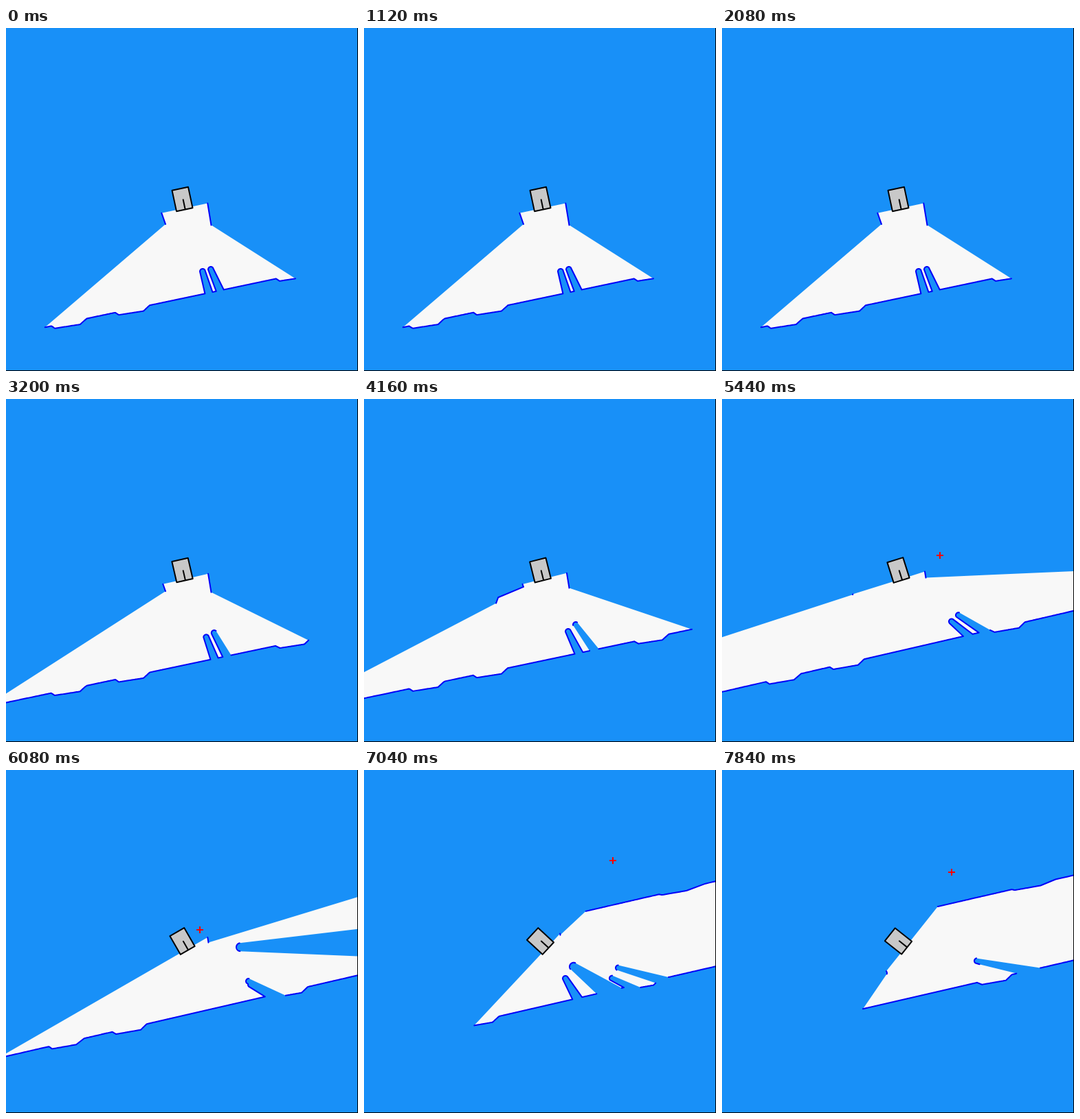
These frames come from a looping animation (512x500 px, 8000 ms). An HTML page with a canvas:

```html
<!DOCTYPE html>
<html lang="en">
<head>
<meta charset="utf-8">
<title>Range scan</title>
<style>
  html, body { margin: 0; width: 100%; height: 100%; overflow: hidden; background: #1890f8; }
  canvas { display: block; width: 100vw; height: 100vh; }
</style>
</head>
<body>
<canvas id="stage" width="512" height="500"></canvas>
<script>
// A robot sweeps a half circle of rays; the area they reach is the floor it can see.
const ctx = document.getElementById('stage').getContext('2d');
const LOOP = 8000, STEP = 160;
const SKY = '#1890f8', FLOOR = '#f8f8f8', WALL = '#0000f8';
const RAYS = 900, RANGE = 900, LINK = 41;
const ROBOT = { x: 256.5, y: 249.5, w: 24, h: 31, sensor: 13.5 };

// time, world dx, dy, shear, robot heading in degrees
const DRIVE = [
  [2320, 0, 0, 0, -12], [4160, 0, -12, 0, -14], [5440, -2, -25, -.02, -17.5],
  [6080, -4, -34, -.02, -30], [7040, -13, -45, -.02, -47], [7840, -21, -52, -.02, -51.5]
];

// time, x, y of each walking leg
const LEGS = [
  { r: 4, path: [[2320,286,355], [4160,297,351], [5440,336,352], [6080,357,345], [7040,374,352], [7840,392,334]] },
  { r: 4, path: [[2320,298,352], [4160,308,341], [5440,346,343], [6080,360,350], [7040,383,337], [7840,398,336]] },
  { r: 4, path: [[4160,540,250], [5440,410,270], [6080,366,294], [7040,306,351], [7840,257,349]] },
  { r: 6, path: [[4160,520,262], [5440,393,279], [6080,345,295], [7040,318,334], [7840,240,320]] }
];
const GOAL = [[4320,320,223], [5440,317,228], [6080,282,233], [6720,345,134], [7040,362,132], [7200,358,100], [7840,334,149]];

const LEFT_JAMB = [[225,266], [232,286], [196,299], [192,310]];
const RIGHT_JAMB = [[298.5,287.5], [293,254]];

function at(keys, t) {
  let i = 0;
  while (i < keys.length - 2 && t >= keys[i + 1][0]) i++;
  const [a, b] = [keys[i], keys[i + 1]];
  const p = Math.min(1, Math.max(0, (t - a[0]) / (b[0] - a[0])));
  return a.slice(1).map((v, n) => v + (b[n + 1] - v) * p);
}

const noise = n => { const v = Math.sin(n * 12.9898) * 43758.5453; return v - Math.floor(v) - .5; };

// A sloping corridor wall with shallow door recesses
function corridorWall(from, offset, depth, doors, t) {
  const point = (x, d) => [x, 448.3 - .211 * x + offset + d];
  const recesses = doors.flatMap(([a, b]) => {
    const shake = noise(a + t);
    return [point(a + shake, 0), point(a + 5, depth - 1), point(b - 9, depth + 1), point(b + shake, 0)];
  });
  return [point(from, 0), ...recesses, point(2000, 0)];
}

function buildWorld(t) {
  const [dx, dy, shear] = at(DRIVE, t);
  const place = ([x, y]) => [x + dx, y + dy + shear * (x - 205)];
  const lines = [
    corridorWall(-2000, 0, 5.5, [[66, 117], [159, 209], [393, 443]], t),
    corridorWall(325, -124, 3, [[442, 494]], t),
    LEFT_JAMB, RIGHT_JAMB
  ].map(line => line.map(place));
  return {
    segments: lines.flatMap(line => line.slice(1).map((end, i) => [line[i], end])),
    legs: LEGS.map(leg => ({ r: leg.r, c: place(at(leg.path, t)) }))
  };
}

function castRay([sx, sy], angle, world) {
  const ux = Math.cos(angle), uy = Math.sin(angle);
  let dist = RANGE;
  for (const [[ax, ay], [bx, by]] of world.segments) {
    const ex = bx - ax, ey = by - ay, det = ux * ey - uy * ex;
    const along = ((ax - sx) * ey - (ay - sy) * ex) / det;
    const part = ((ax - sx) * uy - (ay - sy) * ux) / det;
    if (along > 0 && part >= 0 && part <= 1) dist = Math.min(dist, along);
  }
  for (const { r, c } of world.legs) {
    const px = c[0] - sx, py = c[1] - sy;
    const along = px * ux + py * uy, side = px * uy - py * ux;
    if (along > 0 && Math.abs(side) < r) dist = Math.min(dist, along - Math.sqrt(r * r - side * side));
  }
  return { x: sx + ux * dist, y: sy + uy * dist, dist };
}

function drawScan(t, heading) {
  const sensor = [ROBOT.x - ROBOT.sensor * Math.sin(heading), ROBOT.y + ROBOT.sensor * Math.cos(heading)];
  const world = buildWorld(t);
  const hits = Array.from({ length: RAYS + 1 }, (_, i) => castRay(sensor, heading + Math.PI * i / RAYS, world));

  ctx.beginPath();
  ctx.moveTo(...sensor);
  hits.forEach(h => ctx.lineTo(h.x, h.y));
  ctx.fillStyle = FLOOR;
  ctx.fill();

  // Only neighbouring hits that lie close together count as one surface.
  ctx.beginPath();
  hits.forEach((h, i) => {
    const last = hits[i - 1];
    const linked = last && h.dist < RANGE && last.dist < RANGE && Math.hypot(h.x - last.x, h.y - last.y) < LINK;
    if (linked) ctx.lineTo(h.x, h.y);
    else ctx.moveTo(h.x, h.y);
  });
  ctx.strokeStyle = WALL;
  ctx.lineWidth = 2;
  ctx.stroke();
}

function drawRobot(heading) {
  const { x, y, w, h } = ROBOT;
  ctx.save();
  ctx.translate(x, y);
  ctx.rotate(heading);
  ctx.fillStyle = '#c8c8c8';
  ctx.strokeStyle = '#000';
  ctx.beginPath();
  ctx.rect(-w / 2, -h / 2, w, h);
  ctx.fill();
  ctx.moveTo(1, 1);
  ctx.lineTo(1, h / 2);
  ctx.stroke();
  ctx.restore();
}

function drawGoal(t) {
  if (t < GOAL[0][0]) return;
  const [x, y] = at(GOAL, t).map(Math.round);
  ctx.fillStyle = '#f80000';
  ctx.fillRect(x - 5, y - 1, 10, 2);
  ctx.fillRect(x - 1, y - 5, 2, 10);
}

function draw(t) {
  const heading = at(DRIVE, t)[3] * Math.PI / 180;
  ctx.fillStyle = SKY;
  ctx.fillRect(0, 0, 512, 500);
  ctx.lineJoin = ctx.lineCap = 'round';
  drawScan(t, heading);
  drawRobot(heading);
  drawGoal(t);
  ctx.fillStyle = '#000';
  ctx.fillRect(511, 0, 1, 500);
  ctx.fillRect(0, 499, 512, 1);
}

const began = performance.now();
function tick() {
  const t = (performance.now() - began) % LOOP;
  draw(Math.floor(t / STEP) * STEP);
  requestAnimationFrame(tick);
}
tick();
</script>
</body>
</html>
```
